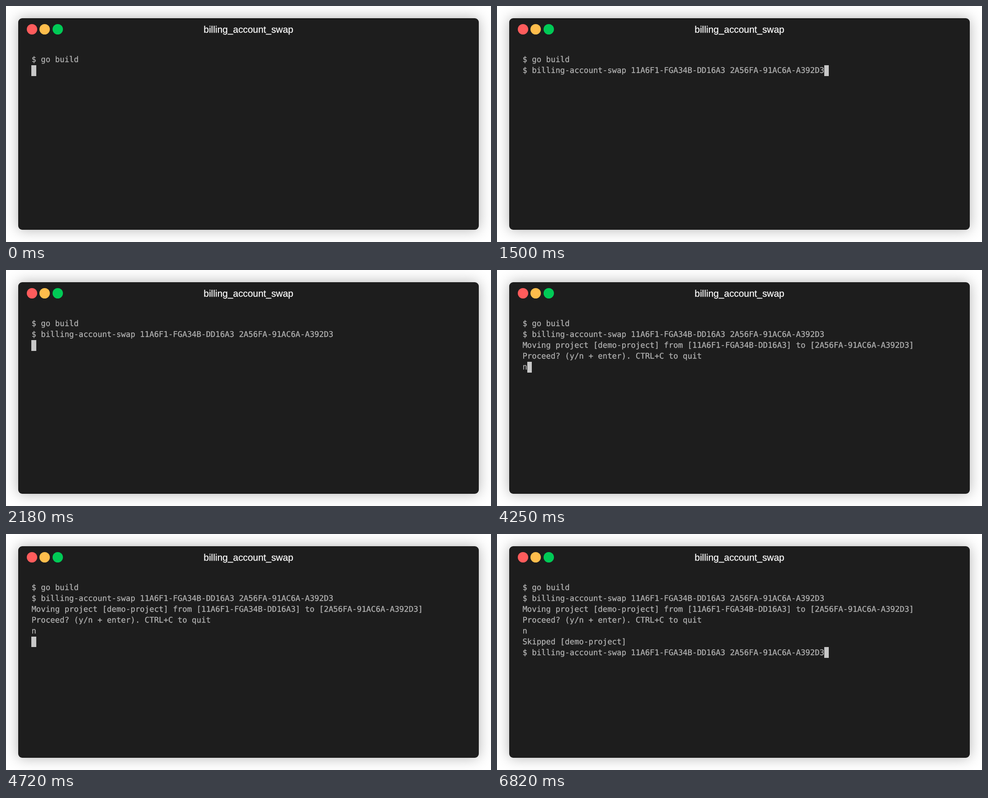
An HTML page for the animation above (8 s loop, 1073 by 522 pixels).

```html
<!DOCTYPE html>
<html lang="en">
<head>
<meta charset="utf-8">
<title>Terminal</title>
<style>
  html, body { margin: 0; width: 100%; height: 100%; overflow: hidden; background: #fff; }
  .window {
    position: absolute; left: 27px; top: 27px; width: 1019px; height: 468px;
    border-radius: 9px; background: #1d1d1d; box-shadow: 0 0 30px rgba(0, 0, 0, .3);
  }
  .dot { position: absolute; top: 13px; width: 23px; height: 23px; border-radius: 50%; }
  .title {
    position: absolute; left: 0; right: 0; top: 13px; text-align: center; color: #fff;
    font: 20.86px/25px "Liberation Sans", Arial, sans-serif; text-rendering: geometricPrecision;
    -webkit-text-stroke: .25px;
  }
  .screen {
    position: absolute; left: 29.4px; top: 80.1px; color: #b2b2b2;
    font: 17.33px/23.9px "DejaVu Sans Mono", monospace; text-rendering: geometricPrecision;
    font-variant-ligatures: none;
  }
  #text {
    position: relative; top: 1px; margin: 0; font: inherit; white-space: pre;
    -webkit-text-stroke: .3px;
  }
  #cursor { position: absolute; width: 1ch; height: 23.9px; background: #c7c7c7; }
</style>
</head>
<body>
<div class="window">
  <div class="dot" style="left:19px;background:#ff5c5c"></div>
  <div class="dot" style="left:47.3px;background:#ffbd4c"></div>
  <div class="dot" style="left:75.6px;background:#00ca56"></div>
  <div class="title">billing_account_swap</div>
  <div class="screen"><pre id="text"></pre><div id="cursor"></div></div>
</div>
<script>
  const LOOP = 8000, LINE = 23.9;
  const from = '11A6F1-FGA34B-DD16A3', to = '2A56FA-91AC6A-A392D3', project = '[demo-project]';
  const command = `billing-account-swap ${from} ${to}`;

  // [time in ms, output appended at that time]
  const steps = [
    [0, '$ go build\n'],
    [500, '$ '],
    [1500, command],
    [2180, '\n'],
    [2850, `Moving project ${project} from [${from}] to [${to}]\nProceed? (y/n + enter). CTRL+C to quit\n`],
    [4250, 'n'],
    [4720, '\n'],
    [4820, `Skipped ${project}\n$ `],
    [6820, command],
  ];

  const text = document.getElementById('text');
  const cursor = document.getElementById('cursor');
  let shown;

  function draw() {
    const t = performance.now() % LOOP;
    const output = steps.filter(([at]) => at <= t).map(step => step[1]).join('');
    if (output !== shown) {
      shown = output;
      const lines = output.split('\n');
      text.textContent = output;
      cursor.style.left = `${lines[lines.length - 1].length}ch`;
      cursor.style.top = `${(lines.length - 1) * LINE}px`;
    }
    requestAnimationFrame(draw);
  }
  draw();
</script>
</body>
</html>
```
